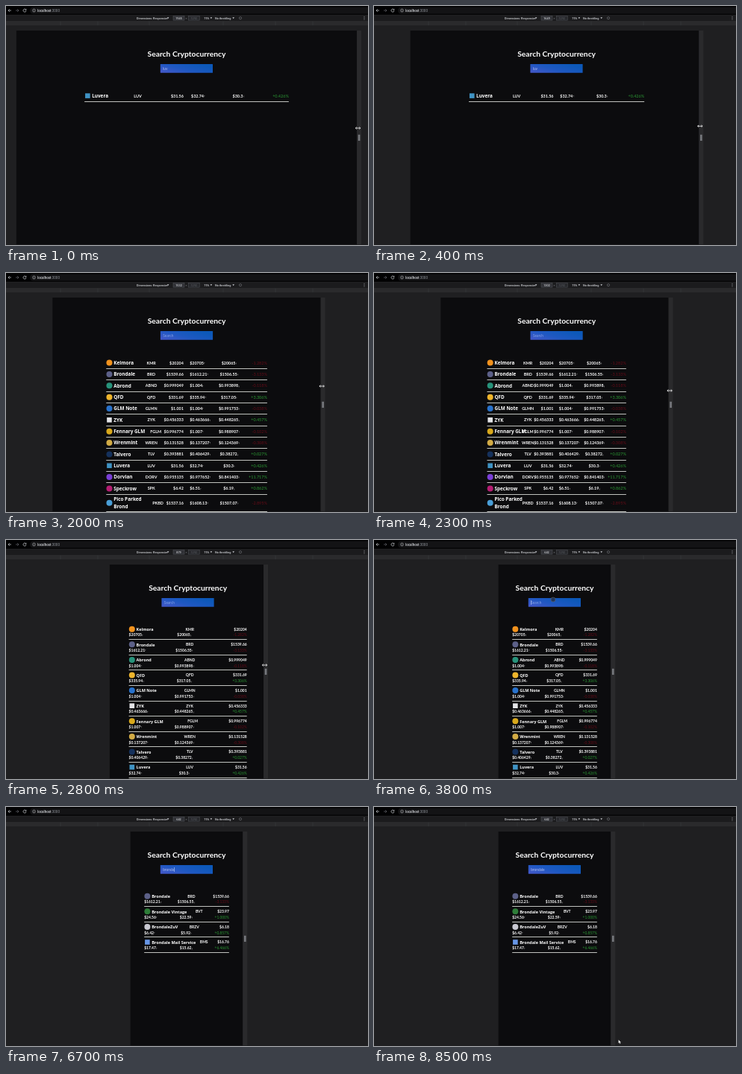
Animation of 485x321 px, one loop 8600 ms. Source, as an HTML page:

```html
<!DOCTYPE html>
<html lang="en">
<head>
<meta charset="utf-8">
<title>Search Cryptocurrency</title>
<style>
html, body { margin: 0; width: 100%; height: 100%; overflow: hidden; background: #1f1f21; }
svg { display: block; width: 100vw; height: 100vh; font-family: Lato, "Open Sans", sans-serif; }
text { fill: #fff; white-space: pre; }
.ui { font: 500 3.8px Roboto, sans-serif; fill: #d4d6da; }
.dim { fill: #777a80; }
.title { font-size: 10.3px; font-weight: 700; }
.none { font-size: 7.8px; font-weight: 700; }
.field { font-size: 4.8px; fill: #b3c3f2; }
.hint { fill: #86a3e6; }
.name { font-family: "Open Sans", sans-serif; font-weight: 700; }
.val { font-weight: 700; }
.wide .name { font-size: 6.4px; }
.wide .val { font-size: 5.4px; }
.wide .pct { font-size: 5.5px; }
.slim .name { font-size: 5.5px; }
.slim .val { font-size: 5px; }
.slim .pct { font-size: 4.9px; }
.tip { font-size: 2.6px; fill: #bbb; }
.up { fill: #2c9c35; }
.down { fill: #660c18; }
.mid { text-anchor: middle; }
.end { text-anchor: end; }
</style>
</head>
<body>
<svg viewBox="0 0 485 321" preserveAspectRatio="none">
  <defs>
    <linearGradient id="blue" x1="0" y1="1" x2="1" y2="0.4">
      <stop offset="0" stop-color="#4658c9"/>
      <stop offset="0.5" stop-color="#1f58c2"/>
      <stop offset="1" stop-color="#0c58b8"/>
    </linearGradient>
  </defs>
  <rect width="485" height="321" fill="#1f1f21"/>
  <rect width="485" height="12" fill="#020203"/>
  <rect x="32" y="1.5" width="460" height="9" rx="4.5" fill="#131315"/>
  <rect y="12" width="485" height="8.5" fill="#1b1b1d"/>
  <rect y="20.5" width="485" height="5.5" fill="#2a2a2c"/>
  <path d="M0 12.2H485M0 20.5H485" stroke="#333336" stroke-width=".4"/>
  <path d="M73 20.5v5.5M123 20.5v5.5M192 20.5v5.5M291 20.5v5.5M361 20.5v5.5M411 20.5v5.5" stroke="#3c3d40" stroke-width=".6"/>
  <g fill="none" stroke="#c8cacf" stroke-width=".7">
    <path d="M7 6H3M4.8 4.2L3 6l1.8 1.8"/>
    <path d="M13 6h4M15.2 4.2L17 6l-1.8 1.8" stroke="#66686d"/>
    <path d="M26.6 4.8A2 2 0 1 0 27 6.4M27 3.8v1.5h-1.5"/>
    <circle cx="37.5" cy="6" r="2" stroke-width=".5"/>
    <path d="M37.5 5.7v1.5M37.5 4.7v.5" stroke-width=".5"/>
    <circle cx="314" cy="16.2" r="1.6" stroke="#8b8d92" stroke-width=".5"/>
  </g>
  <text class="ui" x="42" y="7.6" style="font-size:4.5px">localhost<tspan class="dim">:3000</tspan></text>
  <text class="ui" x="175" y="17.7">Dimensions: Responsive</text>
  <text class="ui" x="265.3" y="17.7">75%</text>
  <text class="ui" x="280" y="17.7">No throttling</text>
  <path d="M215.8 15.3h2.6l-1.3 2zM273.6 15.3h2.6l-1.3 2zM303.4 15.3h2.6l-1.3 2z" fill="#c8cacf"/>
  <g stroke="#55575c" stroke-width=".5">
    <rect x="224" y="13.5" width="15" height="5.6" fill="#303136"/>
    <rect x="244.2" y="13.5" width="15" height="5.6" fill="#27282c"/>
  </g>
  <text class="ui mid dim" x="241.6" y="17.7">×</text>
  <text class="ui mid" x="251.7" y="17.7" style="fill:#55575c">1292</text>
  <path d="M479.6 14.4h.8M479.6 16.2h.8M479.6 18h.8" stroke="#c8cacf" stroke-width=".8"/>
  <g id="live"></g>
</svg>
<script>
const LOOP = 8600, TICK = 100, SCALE = 0.2345, MID = 242, BREAK = 1200;

// name, ticker, price, high, low, change, colour, square mark
const coins = [
  ["Kelmora", "KMR", "20204", "20705", "20065", "-1.282", "#f2921d"],
  ["Brondale", "BRD", "1539.66", "1612.21", "1506.55", "-3.133", "#5c6088"],
  ["Abrond", "ABND", "0.999049", "1.004", "0.993898", "-0.118", "#27937b"],
  ["QFD", "QFD", "331.69", "335.94", "317.05", "+3.306", "#efb52c"],
  ["GLM Note", "GLMN", "1.001", "1.004", "0.991753", "-0.038", "#2872cc"],
  ["ZYK", "ZYK", "0.456333", "0.463666", "0.448265", "+0.457", "#e4e5e8", 1],
  ["Fennary GLM", "FGLM", "0.996774", "1.007", "0.988907", "-0.102", "#d9a91c"],
  ["Wrenmint", "WREN", "0.131528", "0.137207", "0.124369", "-0.308", "#d2ab45"],
  ["Talvero", "TLV", "0.393881", "0.406429", "0.38272", "+0.027", "#15315c"],
  ["Luvera", "LUV", "31.56", "32.74", "30.3", "+0.426", "#3f93c4", 1],
  ["Dorvian", "DORV", "0.955135", "0.977652", "0.841403", "+11.717", "#7a3fd8"],
  ["Speckrow", "SPK", "6.42", "6.51", "6.19", "+0.862", "#b51d72"],
  ["Pico Parked Brond", "PKBD", "1537.16", "1608.13", "1507.07", "-2.895", "#4a9fd8"],
  ["Brondale Vintage", "BVT", "23.97", "24.56", "22.59", "+1.000", "#2e7d38"],
  ["BrondaleZuV", "BRZV", "6.18", "6.42", "5.92", "+0.857", "#c9c9d2"],
  ["Brondale Mail Service", "BMS", "16.76", "17.47", "15.62", "+6.466", "#6796e6", 1]
];

const widths = [[0, 1945], [100, 1915], [500, 1560], [600, 1535], [1900, 1535], [2000, 1532],
  [2100, 1485], [2700, 935], [2800, 879], [2900, 837], [3200, 665], [3300, 642]];

const typed = [[0, "luv"], [1200, "lu"], [1300, "l"], [1400, ""], [4800, "e"], [4900, "es"],
  [5000, "ese"], [5300, "br"], [5400, "bro"], [5500, "bron"], [5600, "brond"], [5700, "brondo"],
  [5800, "brondol"], [5900, "brondole"], [6400, "brondo"], [6600, "brond"], [6700, "bronda"],
  [6800, "brondal"], [7100, "brondale"]];

const carets = [[1200, 1600], [3800, 4000], [4200, 4500], [4800, 6100], [6400, 7500]];

// pointer: time, x, y; x = 0 means it holds the resize handle
const pointer = [[0, 0, 164], [600, 0, 160], [700, 400, 140], [800, 330, 105], [900, 270, 82],
  [1000, 247, 83], [1500, 247, 83], [1700, 380, 110], [1800, 433, 140], [1900, 0, 150],
  [2000, 0, 152], [2800, 0, 168], [3300, 0, 165], [3500, 285, 120], [3700, 245, 84],
  [3800, 240, 80], [8000, 243, 84], [8100, 270, 37], [8200, 315, 90], [8300, 328, 200],
  [8400, 328, 290], [8500, 328, 315]];

const live = document.getElementById("live");

function mix(keys, t, i = 1) {
  const n = keys.findIndex(k => k[0] > t);
  if (n < 0) return keys[keys.length - 1][i];
  if (n === 0) return keys[0][i];
  const a = keys[n - 1], b = keys[n];
  return a[i] + (b[i] - a[i]) * (t - a[0]) / (b[0] - a[0]);
}

const label = (cls, x, y, s) => `<text class="${cls}" x="${x.toFixed(2)}" y="${y.toFixed(2)}">${s}</text>`;
const box = (x, y, w, h, fill) => `<rect x="${x}" y="${y}" width="${w}" height="${h}" fill="${fill}"/>`;
const tip = s => `<tspan class="tip" dy="-.6">${s}</tspan>`;

function mark(x, y, r, fill, square) {
  return square ? box(x - r, y - r, 2 * r, 2 * r, fill) : `<circle cx="${x}" cy="${y}" r="${r}" fill="${fill}"/>`;
}

function list(found, cx, w, wide) {
  let y = wide ? 120.6 : 119.7, out = "";
  const x = cx - w / 2, right = cx + w / 2;
  for (const [name, sign, price, high, low, pct, fill, square] of found) {
    const cls = pct[0] === "+" ? "pct end up" : "pct end down";
    const long = Math.max(0, name.length - 8);
    const wrap = wide && name.length > 12;
    if (wrap) y += 4;
    out += mark(x + 4.2, y, square ? 3.3 : 4, fill, square);
    if (wrap) {
      const cut = name.lastIndexOf(" ");
      out += label("name", x + 10, y - 2.8, name.slice(0, cut)) + label("name", x + 10, y + 7.6, name.slice(cut + 1));
    } else out += label("name", x + 10, y + 2.3, name);
    if (wide) {
      const by = y + 1.9;
      const signX = Math.min(cx - 38.5, cx + 19.4 - 0.31 * w + long * 2);
      out += label("val mid", signX, by, sign)
        + label("val end", cx - 4.2, by, "$" + price)
        + label("val", cx - 3.5 + 0.035 * w, by, "$" + high + tip("↑"))
        + label("val mid", cx + 10.5 + 0.2155 * w, by, "$" + low + tip("↓"))
        + label(cls, right, by, pct + "%");
    } else {
      const by = y + 9.7;
      out += label("val mid", cx + 16 - 0.085 * w + long * 1.3, y + 1.8, sign)
        + label("val end", right, y + 1.8, "$" + price)
        + label("val", x, by, "$" + high + tip("↑"))
        + label("val mid", cx + 10.4 - 0.095 * w, by, "$" + low + tip("↓"))
        + label(cls, right, by, pct + "%");
    }
    const line = y + (wrap ? 11.6 : wide ? 7.4 : 13.4);
    out += box(x, Math.round(line), w, 1, "#c0c2be");
    y += wrap ? 19 : wide ? 15.35 : 20.6;
    if (y > 330) break;
  }
  return `<g class="${wide ? "wide" : "slim"}">${out}</g>`;
}

function cursor(t, left, right) {
  if ((t >= 1300 && t < 1500) || (t >= 4800 && t < 8000)) return "";
  const n = pointer.findLastIndex(k => k[0] <= t);
  const at = pointer.map(k => [k[0], k[1] || right + 1.5, k[2]]);
  const x = mix(at, t), y = mix(at, t, 2);
  if (!pointer[n][1])
    return `<path d="M${x - 3} ${y}h6M${x - 1.7} ${y - 1.4}l-1.6 1.4 1.6 1.4M${x + 1.7} ${y - 1.4}l1.6 1.4 -1.6 1.4" fill="none" stroke="#fff" stroke-width=".8"/>`;
  if (x < right && x > left)
    return `<circle cx="${x}" cy="${y}" r="3" fill="#222b3c" fill-opacity=".75" stroke="#59606c" stroke-width=".7"/>`;
  return `<path d="M${x - 0.5} ${y - 2.5}v5l1.2-1 .8 1.8 .9-.4-.8-1.7h1.6z" fill="#fff" stroke="#000" stroke-width=".2"/>`;
}

function draw(t) {
  const w = mix(widths, t), span = w * SCALE, left = MID - span / 2, right = left + span;
  const flow = mix(widths, Math.max(0, t - 25)) * SCALE, cx = left + flow / 2;
  const wide = w > BREAK, text = typed.findLast(k => k[0] <= t)[1];
  const found = coins.filter(c => c[0].toLowerCase().includes(text));
  const caret = carets.some(([a, b]) => t >= a && t < b);
  const ix = cx - 35.2;
  live.innerHTML = label("ui mid", 231.5, 17.7, Math.round(w))
    + box(left, 33, span, 287.3, "#0c0c0e")
    + box(right, 33, 6, 287.3, "#2a2a2c")
    + box(right + 1.7, 172.8, 2.6, 8.2, "#77797e")
    + label("title mid", cx, 68.3, "Search Cryptocurrency")
    + `<rect x="${ix}" y="78" width="70.2" height="11.8" rx=".6" fill="url(#blue)"/>`
    + label(text ? "field" : "field hint", ix + 3.4, 85.6, text || "Search")
    + (found.length ? list(found, cx, flow * (wide ? 0.6 : 0.755), wide) : label("none mid", cx, 121.3, "No results"));
  if (caret) {
    const len = text ? live.querySelector(".field").getComputedTextLength() : 0;
    live.insertAdjacentHTML("beforeend", box(ix + 3.5 + len, 81, 0.5, 6, "#e4eaff"));
  }
  live.insertAdjacentHTML("beforeend", cursor(t, left, right));
}

let last = -1;
function loop() {
  const t = Math.floor(performance.now() % LOOP / TICK) * TICK;
  if (t !== last) draw(last = t);
  requestAnimationFrame(loop);
}
loop();
</script>
</body>
</html>
```
